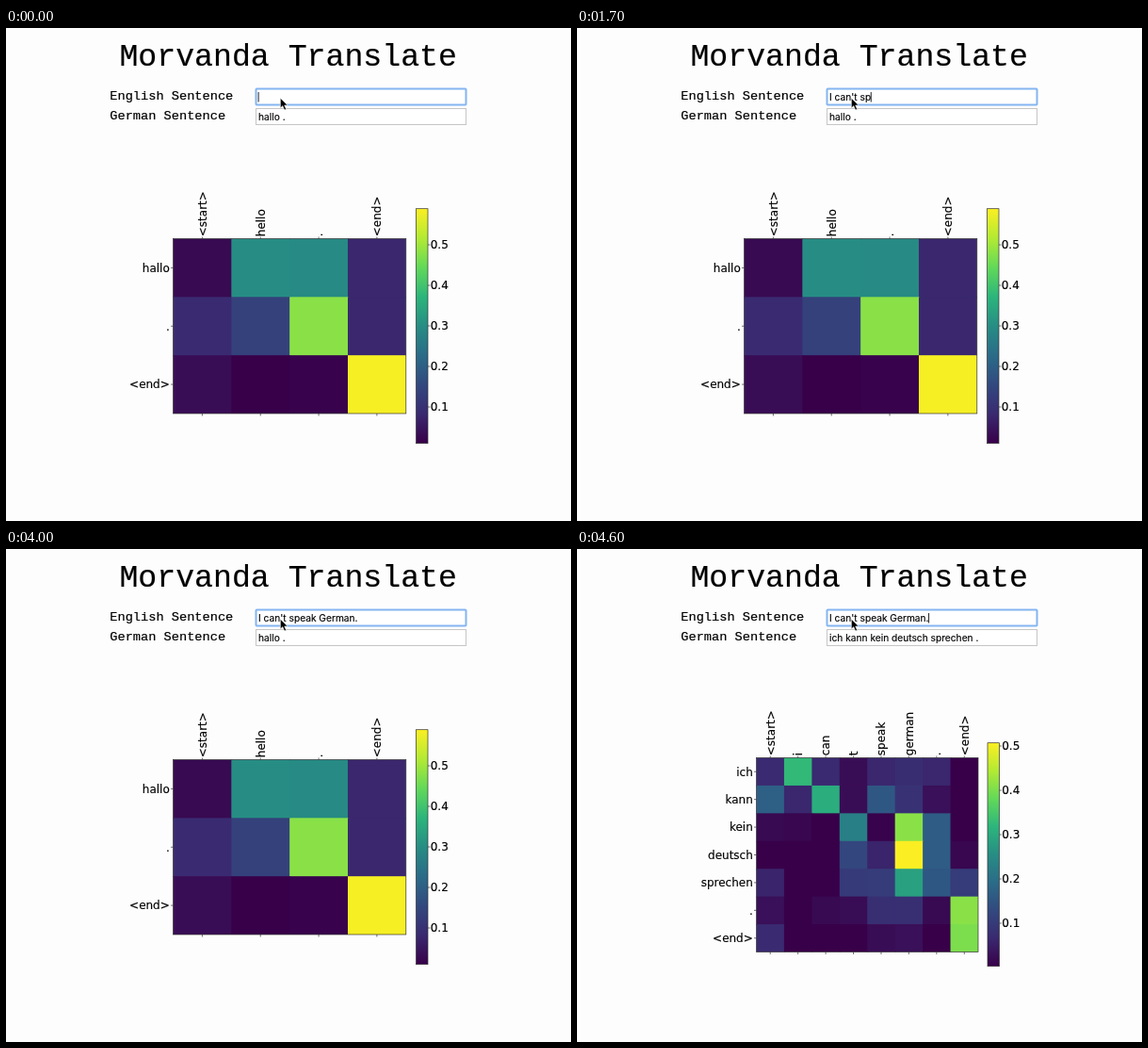
Recreate the animation shown at these times as an HTML page. Size 600 px wide and 523 px high, loop 4700 ms.

```html
<!DOCTYPE html>
<html lang="en">
<head>
<meta charset="utf-8">
<title>Morvanda Translate</title>
<style>
  html, body { margin: 0; width: 100%; height: 100%; overflow: hidden; background: #fefdfe; }
  svg { display: block; width: 600px; height: 523px; }
  text { white-space: pre; }
  .mono { font-family: "Liberation Mono", "Courier New", monospace; stroke: #000; stroke-width: .2; }
  .title { font-size: 33.2px; text-anchor: middle; }
  .label { font-size: 13.65px; }
  .field { font: 10.2px Inter, Roboto, sans-serif; fill: #000; stroke: #000; stroke-width: .15; }
  .plot text { font: 12px "DejaVu Sans", sans-serif; fill: #000; stroke: #000; stroke-width: .15; }
  .plot .row { text-anchor: end; }
  .line { fill: none; stroke: #333; stroke-width: .7; }
</style>
</head>
<body>
<svg viewBox="0 0 600 523">
  <defs><linearGradient id="ramp" x1="0" y1="1" x2="0" y2="0"></linearGradient></defs>
  <text class="mono title" x="299.7" y="40.1">Morvanda Translate</text>
  <text class="mono label" x="110.3" y="76.3">English Sentence</text>
  <text class="mono label" x="110.3" y="97.3">German Sentence</text>

  <rect x="265.5" y="64.5" width="223" height="17" rx=".8" fill="#fff" stroke="#84b5f0" stroke-width="2"/>
  <rect x="265.5" y="85.5" width="223" height="17" fill="#fff" stroke="#c6c6c6"/>
  <text class="field" id="english" x="268" y="76.9"></text>
  <text class="field" id="german" x="268" y="97.9"></text>
  <rect id="caret" y="68" width="1" height="10.5" fill="#222"/>

  <g id="plots"></g>
  <path transform="translate(291.3 74.2) scale(.93)" d="M0 0v11.6l2.7-2.5 2 4.7 2.1-.9-2-4.5h3.7z"
    fill="#000" stroke="#fff" stroke-width=".7"/>
</svg>
<script>
const LOOP = 4700, SWAP = 4100;
const SENTENCE = "I can't speak German.";
// moment at which each character appears
const KEYS = [200, 300, 400, 500, 600, 1300, 1400, 1500, 1600, 1700, 1800, 1900,
  2100, 2200, 2400, 2500, 2600, 2700, 2700, 2900, 3100];
const CARET_OFF = [[1000, 1300], [3400, SWAP]];
const STOPS = ["#380049", "#3a2970", "#32497f", "#2b6b88", "#278d84",
  "#2cb57c", "#62d959", "#b3ea33", "#fbef23"];

const $ = id => document.getElementById(id);

function add(parent, tag, attrs, text) {
  const el = document.createElementNS("http://www.w3.org/2000/svg", tag);
  for (const k in attrs) el.setAttribute(k, attrs[k]);
  if (text) el.textContent = text;
  parent.append(el);
  return el;
}

// percent of the scale to colour
function shade(v) {
  const p = v / 100 * (STOPS.length - 1);
  const i = Math.min(Math.floor(p), STOPS.length - 2);
  const part = (s, c) => parseInt(s.slice(1 + c * 2, 3 + c * 2), 16);
  const mix = c => Math.round(part(STOPS[i], c) + (part(STOPS[i + 1], c) - part(STOPS[i], c)) * (p - i));
  return `rgb(${mix(0)},${mix(1)},${mix(2)})`;
}

STOPS.forEach((c, i) => add($("ramp"), "stop", { offset: i / (STOPS.length - 1), "stop-color": c }));

const DROP = 4.3; // from the middle of a label to its baseline

function plot({ x, y, w, h, gap, cols, rows, values, bar }) {
  const g = add($("plots"), "g", { class: "plot" });
  const cw = w / cols.length, ch = h / rows.length;
  let ticks = "";

  // cells overlap the next ones by a pixel, so that no seams show
  values.forEach((line, r) => line.forEach((v, c) =>
    add(g, "rect", {
      x: x + c * cw, y: y + r * ch, fill: shade(v),
      width: Math.min(cw + 1, w - c * cw), height: Math.min(ch + 1, h - r * ch)
    })));

  cols.forEach((word, c) => {
    const cx = x + (c + .5) * cw;
    ticks += `M${cx} ${y}v-2M${cx} ${y + h}v2.5`;
    add(g, "text", { transform: `translate(${cx + DROP} ${y - gap}) rotate(-90)` }, word);
  });
  rows.forEach((word, r) => {
    const cy = y + (r + .5) * ch;
    ticks += `M${x} ${cy}h-2.5`;
    add(g, "text", { class: "row", x: x - 3.7, y: cy + DROP }, word);
  });

  add(g, "rect", { x: bar.x, y: bar.y, width: 12.5, height: bar.h, fill: "url(#ramp)" });
  for (let i = 1; i <= 5; i++) {
    const ty = bar.top + (5 - i) * bar.step;
    ticks += `M${bar.x + 12.5} ${ty}h2.5`;
    add(g, "text", { x: bar.x + 15.2, y: ty + DROP }, "0." + i);
  }
  add(g, "rect", { class: "line", x, y, width: w, height: h });
  add(g, "rect", { class: "line", x: bar.x, y: bar.y, width: 12.5, height: bar.h });
  add(g, "path", { class: "line", d: ticks });
  return g;
}

const before = plot({
  x: 177.5, y: 223.5, w: 247.3, h: 185.5, gap: 2.3,
  cols: ["<start>", "hello", ".", "<end>"],
  rows: ["hallo", ".", "<end>"],
  values: [[3, 50, 49, 12], [13, 22, 81, 12], [4, 0, 1, 99]],
  bar: { x: 435.5, y: 191.7, h: 249, top: 230, step: 43 }
});

const after = plot({
  x: 190.5, y: 221.5, w: 235.5, h: 206, gap: 2.3,
  cols: ["<start>", "i", "can", "t", "speak", "german", ".", "<end>"],
  rows: ["ich", "kann", "kein", "deutsch", "sprechen", ".", "<end>"],
  values: [
    [13, 64, 13, 4, 12, 14, 12, 0],
    [33, 12, 60, 4, 30, 16, 5, 0],
    [3, 2, 0, 45, 1, 81, 32, 0],
    [0, 0, 0, 24, 11, 100, 32, 2],
    [11, 0, 0, 19, 20, 56, 30, 20],
    [5, 0, 3, 4, 15, 15, 3, 81],
    [13, 0, 0, 0, 4, 5, 0, 79]
  ],
  bar: { x: 436, y: 205.7, h: 237, top: 209, step: 47 }
});

function draw(t) {
  const done = t >= SWAP;
  const english = $("english"), caret = $("caret");
  english.textContent = SENTENCE.slice(0, KEYS.filter(k => k <= t).length);
  $("german").textContent = done ? "ich kann kein deutsch sprechen ." : "hallo .";
  caret.setAttribute("x", 267.6 + english.getComputedTextLength());
  caret.style.display = CARET_OFF.some(([a, b]) => t >= a && t < b) ? "none" : "";
  before.style.display = done ? "none" : "";
  after.style.display = done ? "" : "none";
}

const start = performance.now();
function tick() {
  draw((performance.now() - start) % LOOP);
  requestAnimationFrame(tick);
}
tick();
</script>
</body>
</html>
```
